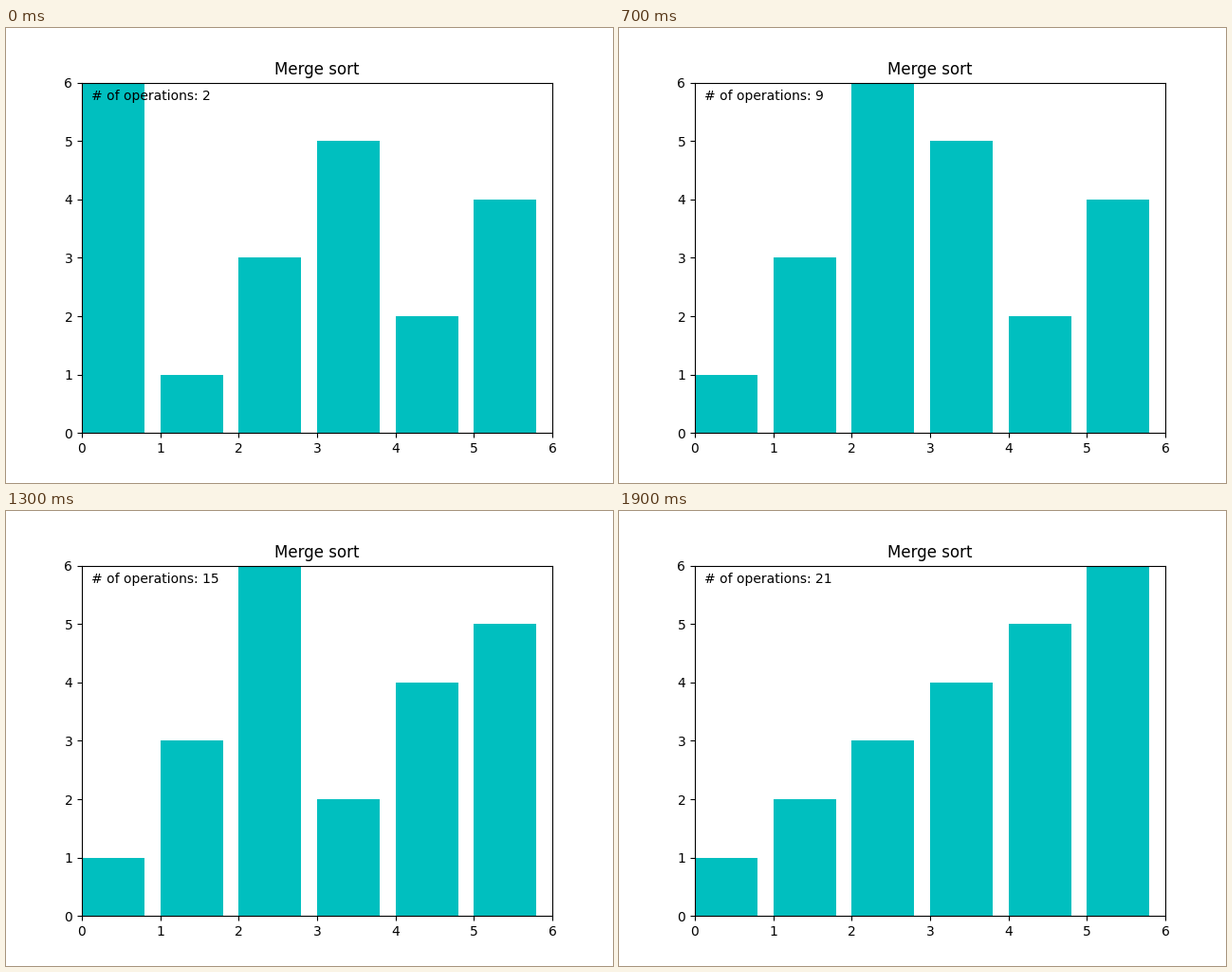
A matplotlib script for the animation above (2000 ms loop, 640 by 480 pixels).

```python
import matplotlib.pyplot as plt
from matplotlib.animation import FuncAnimation

START = [6, 1, 3, 5, 2, 4]
N = len(START)
FIRST_OP = 2
STEP_MS = 100


def merge_sort(a, lo, hi):
    """Sort a[lo..hi] in place, yielding a copy after every operation."""
    if hi <= lo:
        return
    mid = lo + (hi - lo + 1) // 2 - 1
    yield from merge_sort(a, lo, mid)
    yield from merge_sort(a, mid + 1, hi)
    for i, value in enumerate(sorted(a[lo:hi + 1]), lo):
        a[i] = value
        yield a.copy()
    yield a.copy()


states = list(merge_sort(START.copy(), 0, N - 1))[FIRST_OP - 1:]

fig, ax = plt.subplots(figsize=(6.4, 4.8), dpi=100)
ax.set_title("Merge sort")
bars = ax.bar(range(N), START, align="edge", color="c")
ax.set_xlim(0, N)
ax.set_ylim(0, N)
label = ax.text(0.02, 0.95, "", transform=ax.transAxes)


def update(i):
    for bar, value in zip(bars, states[i]):
        bar.set_height(value)
    label.set_text(f"# of operations: {i + FIRST_OP}")
    return [*bars, label]


anim = FuncAnimation(fig, update, frames=len(states),
                     init_func=lambda: update(0),
                     interval=STEP_MS, repeat=True, repeat_delay=0)
plt.show()
```
